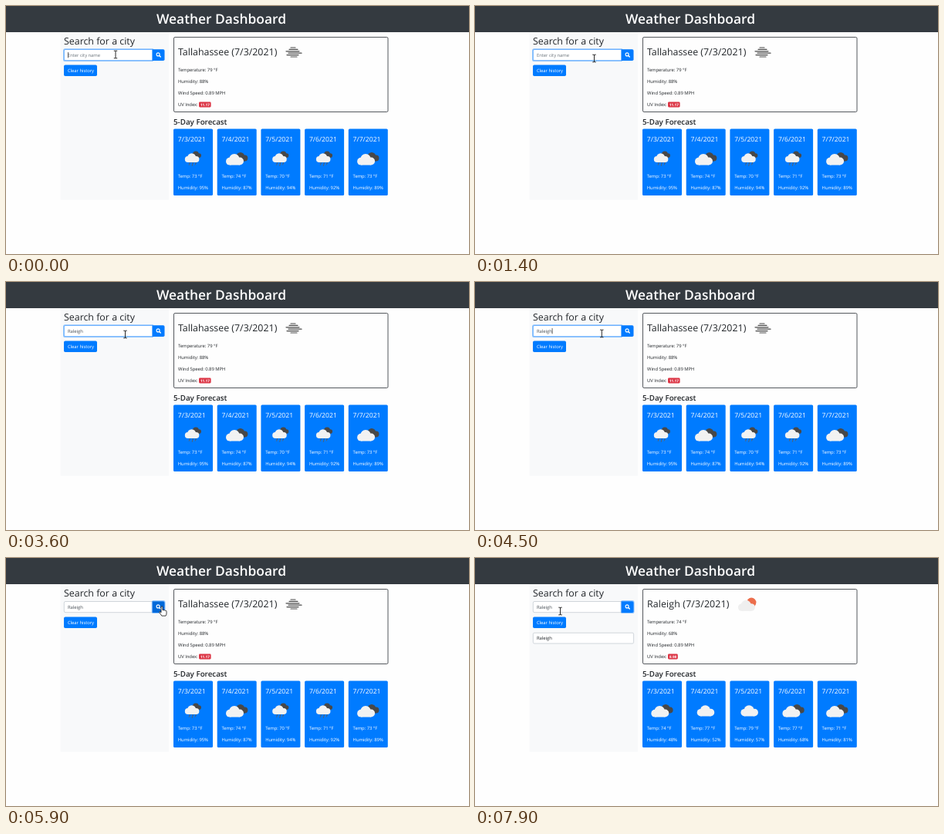
Animation, 600 px wide and 322 px high, one loop 8000 ms. Source, as an HTML page:

```html
<!DOCTYPE html>
<html lang="en">
<head>
<meta charset="utf-8">
<title>Weather Dashboard</title>
<style>
  html, body { margin: 0; width: 100%; height: 100%; overflow: hidden; background: #fefefe; }
  svg { display: block; width: 600px; height: 322px; }
  text {
    font: 5.9px "Open Sans", "Noto Sans", sans-serif;
    letter-spacing: -.05px;
    fill: #212529;
    text-rendering: geometricPrecision;
    white-space: pre;
  }
  .h1 { font-size: 17.4px; font-weight: 600; letter-spacing: 0; fill: #fff; text-anchor: middle; }
  .h2 { font-size: 12.4px; letter-spacing: 0; }
  .h3 { font-size: 9.8px; font-weight: 600; letter-spacing: 0; }
  .date { font-size: 8.65px; letter-spacing: 0; }
  .date, .white { fill: #fff; }
  .badge { font-size: 4.7px; font-weight: 700; letter-spacing: 0; fill: #fff; }
  .field { fill: #fff; stroke: #c6ccd2; stroke-width: .8; }
  .ring { fill: none; stroke: #007bff; stroke-opacity: .4; stroke-width: 1.6; }
</style>
</head>
<body>
<svg viewBox="0 0 600 322">
  <defs>
    <g id="cloud">
      <circle cx="4.7" cy="9.3" r="4.7"/>
      <circle cx="10.5" cy="6.5" r="6.5"/>
      <circle cx="17.3" cy="9.2" r="4.8"/>
      <rect x="4.7" y="7" width="12.6" height="7"/>
    </g>
  </defs>

  <rect x="70.5" y="34" width="140.5" height="217.5" fill="#f8f9fa"/>
  <rect width="600" height="34" fill="#343a40"/>
  <text class="h1" x="279" y="23.2">Weather Dashboard</text>

  <text class="h2" x="75" y="50.2">Search for a city</text>
  <path id="box" class="field" d="M190 56.5H77a1.7 1.7 0 0 0-1.7 1.7V69a1.7 1.7 0 0 0 1.7 1.7H190z"/>
  <path id="boxRing" class="ring" d="M190 56H76.6a1.8 1.8 0 0 0-1.8 1.8V69.4a1.8 1.8 0 0 0 1.8 1.8H190z"/>
  <text id="entry" x="80" y="65.8"></text>
  <rect id="caret" y="60" width=".7" height="7.4" fill="#222"/>
  <path id="button" d="M189.8 56.2H203.7a1.8 1.8 0 0 1 1.8 1.8V69.2a1.8 1.8 0 0 1-1.8 1.8H189.8z"/>
  <rect id="buttonRing" class="ring" x="189.5" y="55.8" width="16.2" height="15.5" rx="1.8"/>
  <g fill="none" stroke="#fff" stroke-linecap="round">
    <circle cx="197.1" cy="62.9" r="2" stroke-width="1.1"/>
    <path d="M198.7 64.5L200.3 66.1" stroke-width="1.4"/>
  </g>

  <rect x="75" y="76.6" width="43" height="14.4" rx="1.8" fill="#007bff"/>
  <text class="white" x="80" y="86">Clear history</text>

  <rect x="217.5" y="40.5" width="277.5" height="97" rx="1.6" fill="#fefefe" stroke="#41464b" stroke-width=".9"/>
  <text class="h3" x="217" y="154">5-Day Forecast</text>
  <g id="before"></g>
  <g id="after"></g>

  <g id="beam" fill="none" stroke-linecap="round">
    <path d="M-1.8-4.8H-.5L0-4.4L.5-4.8H1.8M0-4.4V4.4M-1.8 4.8H-.5L0 4.4L.5 4.8H1.8" stroke="#111" stroke-width=".9"/>
  </g>
  <path id="hand" fill="#fff" stroke="#111" stroke-width=".8" stroke-linejoin="round"
    d="M-1 .6Q0-.7 1 .6V5Q2.1 4.2 2.8 5.2Q3.9 4.6 4.5 5.6Q6 5.2 6 6.8V9.2Q6 11 5 12.4H-.2Q-1.4 10.4-3.2 8.2Q-3.6 6.6-2.2 7L-1 8.1z"/>
</svg>
<script>
const LOOP = 8000, STEP = 100;
const CITY = "Raleigh";
const TYPE_START = 1920, KEY_GAP = 180, TYPE_END = TYPE_START + KEY_GAP * (CITY.length - 1);
const BLINK = 530, CLICK = 5700, LOADED = 6000;
const el = id => document.getElementById(id);

const text = (x, y, s, cls = "") => `<text class="${cls}" x="${x}" y="${y}">${s}</text>`;
const cloud = (x, y, k, fill) =>
  `<use href="#cloud" fill="${fill}" transform="translate(${x} ${y}) scale(${k})"/>`;

const icons = {
  mist: (x, y) => {
    const rows = [[-4, 2], [-6, 5], [-10, 7], [-7, 10], [-9, 6], [-4, 4]];
    const d = rows.map(([a, b], i) => `M${x + a} ${y - 6 + i * 2.4}H${x + b}`).join("");
    return `<path d="${d}" stroke="#484848" stroke-width="1.2" stroke-linecap="round"/>`;
  },
  sun: (x, y) => `<circle cx="${x + 5.2}" cy="${y - 2.2}" r="6.2" fill="#ec6e4c"/>`
    + cloud(x - 12.2, y - 5.2, 1, "#efefef"),
  cloud: (x, y) => cloud(x - 11.3, y - 6.8, 1.02, "#f2f2f2"),
  broken: (x, y) => cloud(x - 3.8, y - 8, .82, "#484848") + cloud(x - 14, y - 6, 1.04, "#f2f2f2"),
  rain: (x, y) => cloud(x - 2.6, y - 9.5, .6, "#484848")
    + `<path d="M${x - 4} ${y + 5}l-1 3.4M${x} ${y + 5}l-1 4.4M${x + 4} ${y + 5}l-1 3"
        stroke="#57606b" stroke-width="1" stroke-linecap="round"/>`
    + cloud(x - 10.5, y - 6.8, .84, "#f2f2f2")
};

function report({ city, icon, iconX, now, uv, days, gap = 0 }) {
  const lines = [`Temperature: ${now[0]} °F`, `Humidity: ${now[1]}%`, "Wind Speed: 0.89 MPH", "UV Index:"];
  const badge = `<rect x="250" y="124.5" width="${uv.length > 4 ? 15.6 : 12.8}" height="7" rx="1.4" fill="#dc3545"/>`;
  const cards = days.map(([kind, temp, wet], i) => {
    const x = 217 + i * 56.7;
    return `<rect x="${x}" y="159.4" width="51" height="86.6" rx="1.6" fill="#007bff"/>`
      + text(x + 5.8, 176, `7/${3 + i}/2021`, "date")
      + icons[kind](x + 25.3, 198)
      + text(x + 5.8, 222.8, `Temp: ${temp} °F`, "white")
      + text(x + 5.8, 237.6, `Humidity: ${wet}%`, "white");
  });
  return `<g style="--gap:${gap}px"><text class="h2" style="letter-spacing:var(--gap)" x="223" y="64.4">${city} (7/3/2021)</text></g>`
    + icons[icon](iconX, 60)
    + lines.map((s, i) => text(223, 85 + i * 14.9, s)).join("")
    + badge + text(251.9, 129.7, uv, "badge") + cards.join("");
}

el("before").innerHTML = report({
  city: "Tallahassee", icon: "mist", iconX: 373, now: [79, 88], uv: "11.17",
  days: [["rain", 73, 95], ["broken", 74, 87], ["rain", 70, 94], ["rain", 71, 92], ["broken", 73, 89]]
});
el("after").innerHTML = report({
  city: CITY, icon: "sun", iconX: 353, now: [74, 68], uv: "8.98", gap: .12,
  days: [["broken", 74, 48], ["cloud", 77, 52], ["cloud", 79, 57], ["broken", 77, 68], ["broken", 71, 81]]
}) + '<rect class="field" x="75.3" y="97.2" width="130.3" height="13.8" rx="1.6"/>' + text(80, 106.3, CITY);

// time, x, y of the pointer
const path = [
  [0, 142, 63], [100, 142, 63], [600, 154.5, 68], [4300, 154.5, 68], [5000, 204, 62.7],
  [5400, 204, 62.7], [5700, 202, 62.7], [7200, 202, 62.7], [7800, 110.5, 69], [LOOP, 110.5, 69]
];

function pointer(t) {
  const i = path.findIndex(p => p[0] > t);
  const [t0, x0, y0] = path[i - 1], [t1, x1, y1] = path[i];
  const k = (t - t0) / (t1 - t0), e = k * k * (3 - 2 * k);
  return [x0 + (x1 - x0) * e, y0 + (y1 - y0) * e];
}

function caretOn(t) {
  if (t >= CLICK) return false;
  if (t >= TYPE_END) return Math.floor((t - TYPE_END) / BLINK) % 2 === 0;
  if (t >= TYPE_START) return true;
  return Math.floor((t + 430) / BLINK) % 2 === 0;
}

const show = (id, on) => el(id).setAttribute("display", on ? "inline" : "none");

function draw(time) {
  const t = Math.floor(time % LOOP / STEP) * STEP;
  const typed = t < TYPE_START ? 0 : Math.min(CITY.length, 1 + Math.floor((t - TYPE_START) / KEY_GAP));
  const focus = t < CLICK;
  const entry = el("entry"), value = typed ? CITY.slice(0, typed) : "Enter city name";
  if (entry.textContent !== value) entry.textContent = value;
  entry.style.fill = typed ? "#495057" : "#6c757d";

  show("caret", caretOn(t));
  el("caret").setAttribute("x", typed ? 80 + entry.getComputedTextLength() : 80);
  show("boxRing", focus);
  el("box").style.stroke = focus ? "#80bdff" : "";
  show("buttonRing", !focus);
  show("before", t < LOADED);
  show("after", t >= LOADED);

  const [x, y] = pointer(t), over = x > 190;
  el("button").setAttribute("fill", over ? "#0069d9" : "#007bff");
  show("hand", over);
  show("beam", !over);
  el(over ? "hand" : "beam").setAttribute("transform", `translate(${x} ${y})`);
}

const start = performance.now();
function tick() {
  draw(performance.now() - start);
  requestAnimationFrame(tick);
}
tick();
</script>
</body>
</html>
```
